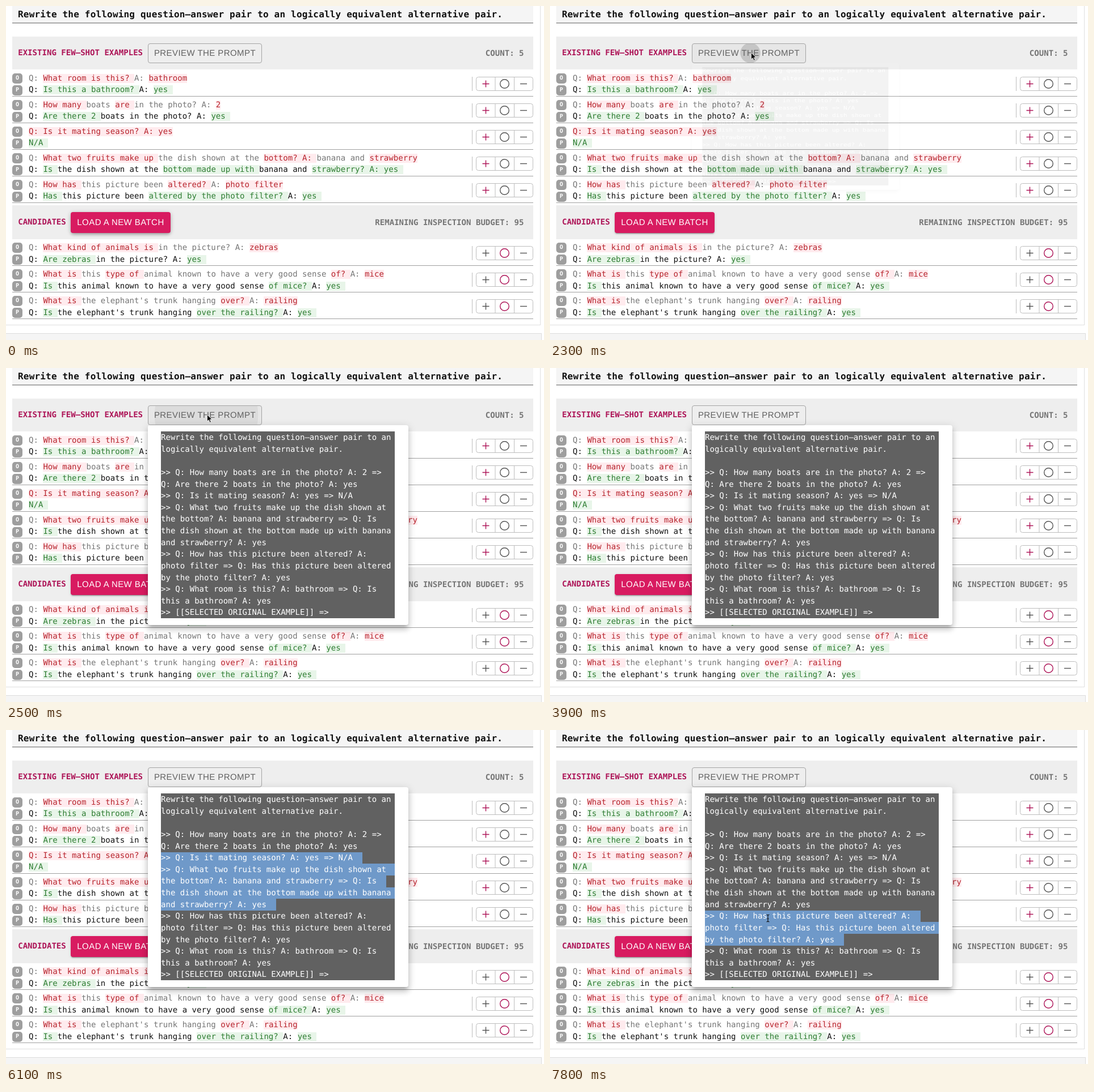
Write an HTML page that moves like this. It is 948 by 590 pixels and loops after 8 s.

```html
<!DOCTYPE html>
<html lang="en">
<head>
<meta charset="utf-8">
<style>
html, body { margin: 0; width: 100%; height: 100%; overflow: hidden; background: #fff; }
#stage { position: relative; width: 948px; height: 590px; overflow: hidden; text-rendering: geometricPrecision;
  font: 14.06px/20.5px "DejaVu Sans Mono", "Liberation Mono", monospace; color: #111; }
#stage div, #stage svg { position: absolute; box-sizing: border-box; white-space: pre; }
.frame { left: -5px; top: -5px; width: 947px; height: 569px; border: 1px solid #e0e0e0; }
.next { left: -5px; top: 578px; width: 949px; height: 30px; border: 1px solid #ddd; background: #f5f5f5; }
.title { left: 11px; top: -10px; width: 918px; height: 41px; padding: 15px 0 0 10px; background: #f5f5f5;
  border-bottom: 2px solid #aaa; font-size: 16px; font-weight: 700; letter-spacing: .185px; }
.head { left: 11px; width: 918px; background: #eee; font-weight: 700; }
.name { left: 10.2px; color: #ad1457; }
.info { right: 16.5px; color: #757575; }
.button { border-radius: 4px; overflow: hidden; text-align: center;
  font: 15px/35px "Liberation Sans", Arial, sans-serif; letter-spacing: .43px; }
#preview { left: 250px; top: 66px; width: 201px; height: 35px; border: 1px solid #a4a4a4; line-height: 33px; color: #616161; }
#load { left: 114px; top: 364px; width: 176px; height: 37px; background: #d81b60; color: #fff; line-height: 37px; }
#ripple { left: -4px; top: -90px; width: 212px; height: 212px; border-radius: 50%; background: #616161; }
.row { left: 11px; width: 918px; height: 47px; border-bottom: 1px solid #a0a0a0; }
.row .text { left: 29px; }
.o { top: 4.7px; color: #757575; }
.p { top: 25.2px; }
.o span { color: #b7242d; background: #ffebee; }
.p span { color: #2e7d32; background: #e8f5e9; }
.badge { left: 0; width: 18px; height: 18px; border-radius: 5px; background: #9e9e9e; color: #fff;
  font-size: 10px; font-weight: 700; line-height: 18px; text-align: center; }
.row svg { left: 810px; top: 12px; fill: none; stroke: #555; stroke-width: 1.4; }
#popup { left: 250px; top: 101px; width: 459px; height: 353px; border-radius: 4px; background: #fff; transform-origin: 0 0;
  box-shadow: 0 5px 5px -3px #0003, 0 8px 10px 1px #00000024, 0 3px 14px 2px #0000001f; }
#prompt { left: 23px; top: 11px; width: 412px; height: 330px; overflow: hidden; background: #616161; color: #fff;
  font-size: 14.04px; line-height: 20.63px; }
#marks { top: .5px; }
#lines { top: 1px; }
#prompt .mark { height: 20.7px; background: #6f99c9; }
#stage .pointer { left: 0; top: 0; overflow: visible; }
</style>
</head>
<body>
<div id="stage">
  <div class="frame"></div>
  <div class="next"></div>
  <div class="title">Rewrite the following question–answer pair to an logically equivalent alternative pair.</div>
  <div class="head" style="top:54px;height:58px"><div class="name" style="top:18.5px">EXISTING FEW–SHOT EXAMPLES</div><div class="info" style="top:19.5px">COUNT: 5</div></div>
  <div class="head" style="top:352px;height:60px"><div class="name" style="top:19.5px">CANDIDATES</div><div class="info" style="top:20.5px">REMAINING INSPECTION BUDGET: 95</div></div>
  <div class="button" id="preview"><div id="ripple"></div>PREVIEW THE PROMPT</div>
  <div class="button" id="load">LOAD A NEW BATCH</div>
  <div id="rows"></div>
  <div id="popup"><div id="prompt"><div id="marks"></div><div id="lines"></div></div></div>
  <svg id="arrow" class="pointer" width="12" height="17"><path d="M.5 .5V12.2L3.3 9.7L5.3 14.3L7.3 13.4L5.4 9H9Z" fill="#000" stroke="#fff" stroke-width=".8"/></svg>
  <svg id="beam" class="pointer" width="8" height="15"><path d="M1 .7Q3.5 .7 3.5 2.5Q3.5 .7 6 .7M3.5 2V12M1 13.3Q3.5 13.3 3.5 11.5Q3.5 13.3 6 13.3M2 8H5" fill="none" stroke="#111" stroke-width="1.1"/></svg>
</div>
<script>
const $ = id => document.getElementById(id);
const CHAR = 8.45, LINE = 20.63, LOOP = 8000, PINK = '#ad1457';

// Brackets mark the highlighted parts.
const examples = [
  ['Q: [What room is this? ]A: [bathroom]', 'Q: [Is this a bathroom? ]A: [yes ]'],
  ['Q: [How many ]boats [are ]in the photo? A: [2]', 'Q: [Are there 2 ]boats in the photo? A: [yes ]'],
  ['[Q: Is it mating season? A: yes]', '[N/A ]'],
  ['Q: [What two fruits make up ]the dish shown at the [bottom? A: ]banana and [strawberry]',
   'Q: [Is ]the dish shown at the [bottom made up with ]banana and [strawberry? A: yes ]'],
  ['Q: [How has ]this picture been [altered? ]A: [photo filter]',
   'Q: [Has ]this picture been [altered by the photo filter? ]A: [yes ]']
];
const candidates = [
  ['Q: [What kind of animals is ]in the picture? A: [zebras]', 'Q: [Are zebras ]in the picture? A: [yes ]'],
  ['Q: [What is ]this [type of ]animal known to have a very good sense [of? ]A: [mice]',
   'Q: [Is ]this animal known to have a very good sense [of mice? ]A: [yes ]'],
  ["Q: [What is ]the elephant's trunk hanging [over? ]A: [railing]",
   "Q: [Is ]the elephant's trunk hanging [over the railing? ]A: [yes ]"]
];
const lines = `Rewrite the following question–answer pair to an
logically equivalent alternative pair.

>> Q: How many boats are in the photo? A: 2 =>
Q: Are there 2 boats in the photo? A: yes
>> Q: Is it mating season? A: yes => N/A
>> Q: What two fruits make up the dish shown at
the bottom? A: banana and strawberry => Q: Is
the dish shown at the bottom made up with banana
and strawberry? A: yes
>> Q: How has this picture been altered? A:
photo filter => Q: Has this picture been altered
by the photo filter? A: yes
>> Q: What room is this? A: bathroom => Q: Is
this a bathroom? A: yes
>> [[SELECTED ORIGINAL EXAMPLE]] =>`.split('\n');

const markup = s => s.replace(/\[/g, '<span>').replace(/]/g, '</span>');
const stroke = on => on ? `stroke="${PINK}"` : '';
const row = (y, [o, p], chosen) => `<div class="row" style="top:${y}px">
  <div class="badge" style="top:6px">O</div><div class="badge" style="top:26.5px">P</div>
  <div class="text o">${markup(o)}</div><div class="text p">${markup(p)}</div>
  <svg width="109" height="26">
    <path d="M.5 0V25M41 .5V24.5M74.5 .5V24.5" stroke="#bdbdbd" stroke-width="1"/>
    <rect x="7.5" y=".5" width="100" height="24" rx="4" stroke="#bdbdbd" stroke-width="1"/>
    <path d="M18.5 12.5H30.5M24.5 6.5V18.5" ${stroke(chosen)}/>
    <circle cx="57.5" cy="12.5" r="7.8" ${stroke(!chosen)}/>
    <path d="M85 12.5H97"/>
  </svg></div>`;

$('rows').innerHTML = examples.map((r, i) => row(113 + 47 * i, r, true)).join('') +
  candidates.map((r, i) => row(412.4 + 47 * i, r, false)).join('');
$('lines').textContent = lines.join('\n');

const clamp = x => Math.min(1, Math.max(0, x));
// cubic-bezier(.4, 0, .2, 1)
function ease(x) {
  if (x <= 0 || x >= 1) return clamp(x);
  let a = 0, b = 1, t;
  for (let i = 0; i < 20; i++) {
    t = (a + b) / 2;
    if (1.2 * t * (1 - t) ** 2 + .6 * t * t * (1 - t) + t ** 3 < x) a = t; else b = t;
  }
  return 3 * t * t * (1 - t) + t ** 3;
}

const mark = (line, from, to) =>
  `<div class="mark" style="left:${from * CHAR}px;top:${line * LINE}px;width:${(to - from) * CHAR}px"></div>`;
const block = (first, last) => lines.slice(first, last + 1)
  .map((s, i) => mark(first + i, 0, s.length + 2)).join('');

function selection(t) {
  if (t < 5700) return '';
  if (t < 5800) return mark(6, 11, 14);
  if (t < 6100) return block(6, 9);
  if (t < 7400) return block(5, 9);
  if (t < 7500) return '';
  if (t < 7600) return mark(10, 10, 13);
  return block(10, 12);
}

function arrowAt(t) {
  if (t >= 1600 && t < 3600) {
    const k = ease((t - 2800) / 600);
    return [354 + 2.5 * k, 82 + 132 * k];
  }
  if (t >= 4400 && t < 5100) return [356.5, 214];
  if (t >= 5600 && t < 6100) return [368.5, 234];
}

function place(el, at) {
  el.style.display = at ? '' : 'none';
  if (at) el.style.transform = `translate(${at[0]}px,${at[1]}px)`;
}

let marked = '';
function draw(now) {
  const t = Math.floor(now % LOOP / 100) * 100;

  const lift = 1 - clamp(t / 500);
  $('load').style.boxShadow = `0 ${3 + lift}px ${1 + 4 * lift}px -2px #0003, 0 2px ${2 + 4 * lift}px #00000024, 0 1px ${5 + 5 * lift}px #0000001f`;

  const hover = t < 2800 ? clamp((t - 1500) / 300) : 0;
  $('preview').style.backgroundColor = `rgba(0,0,0,${.03 * hover})`;

  const ripple = $('ripple').style;
  ripple.transform = `scale(${ease((t - 2180) / 550)})`;
  ripple.opacity = t < 2200 ? 0 : .25 * clamp((2600 - t) / 300);

  const size = .75 + .25 * ease((t - 2262) / 168);
  const popup = $('popup').style;
  popup.opacity = ease((t - 2262) / 253);
  popup.transform = `scale(${size},${size * size})`;

  const marks = selection(t);
  if (marks !== marked) $('marks').innerHTML = marked = marks;

  place($('arrow'), arrowAt(t));
  place($('beam'), t >= 7400 && [380.5, 325.5]);
}

let start;
function tick(now) {
  start ??= now;
  draw(now - start);
  requestAnimationFrame(tick);
}
draw(0);
requestAnimationFrame(tick);
</script>
</body>
</html>
```
